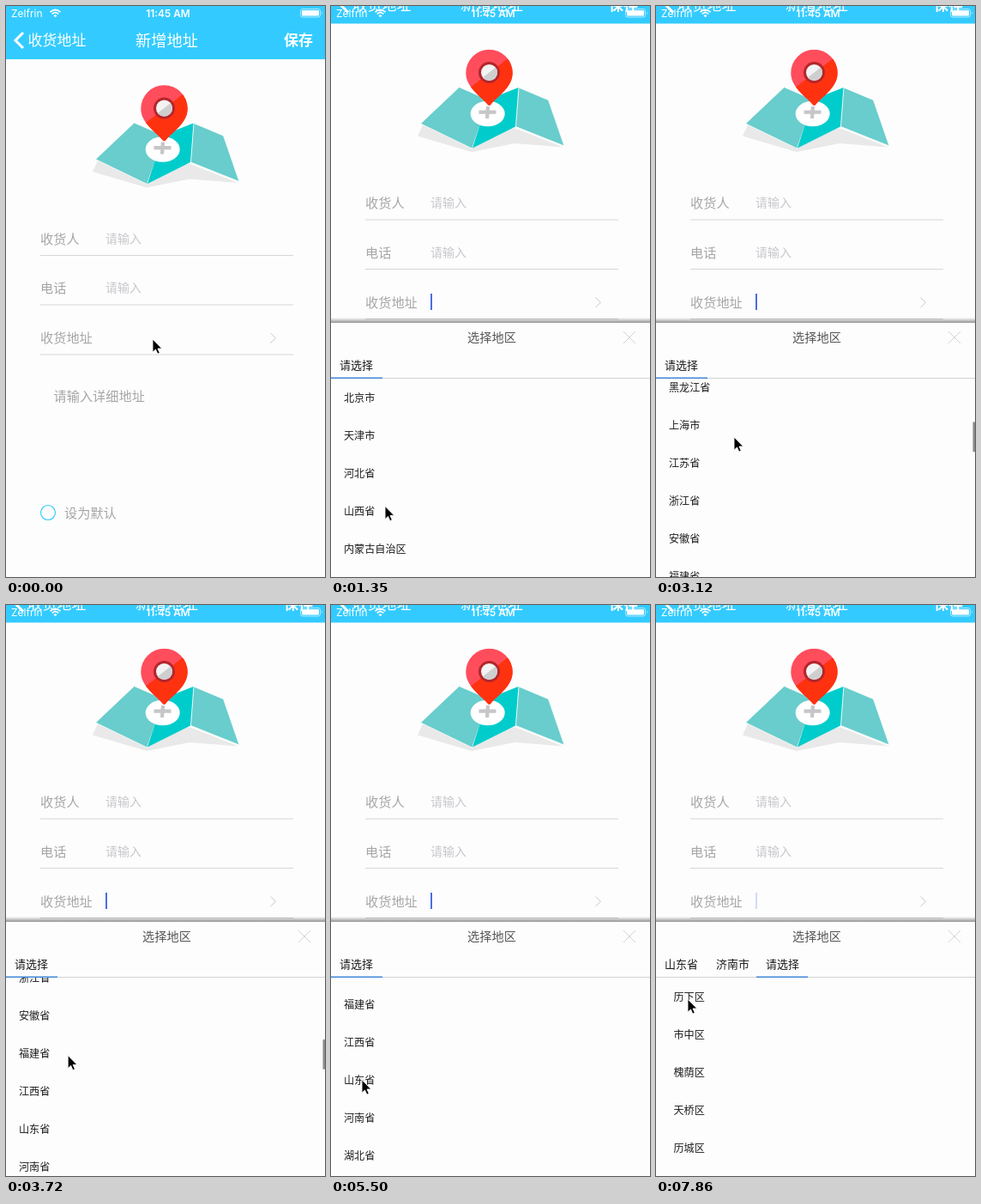
Write an HTML page that moves like this. It is 372x665 px and loops after 8 s.

```html
<!DOCTYPE html>
<html lang="zh-CN">
<head>
<meta charset="utf-8">
<title>新增地址</title>
<style>
html, body { margin: 0; width: 100%; height: 100%; overflow: hidden; background: #fdfdfd; }
svg { display: block; width: 372px; height: 665px; }
text { font-family: "Noto Sans CJK SC", "Noto Sans CJK", sans-serif; white-space: pre; }
.status text { font-family: Inter, Roboto, sans-serif; }
</style>
</head>
<body>
<svg viewBox="0 0 372 665" xmlns="http://www.w3.org/2000/svg">
  <defs>
    <linearGradient id="shade" x1="0" y1="0" x2="0" y2="1">
      <stop offset="0" stop-opacity="0"/>
      <stop offset="1" stop-opacity=".42"/>
    </linearGradient>
    <clipPath id="listClip"><rect y="434" width="372" height="240"/></clipPath>
    <clipPath id="pinClip"><path id="pinShape" d="M157.300 119.500a27.200 27.200 0 0 1 54.400 0C211.700 136 195 146 186.500 156Q184.500 158.500 182.500 156C174 146 157.300 136 157.300 119.500z"/></clipPath>
    <clipPath id="hubClip"><circle cx="184.500" cy="119" r="9.500"/></clipPath>
  </defs>
  <rect width="372" height="665" fill="#fdfdfd"/>

  <g id="page">
    <rect width="372" height="62" fill="#33cbff"/>
    <path d="M20 31L11 40L20 49" fill="none" stroke="#fff" stroke-width="3"/>

    <path d="M107 180L101 193L164 211.500L214 201.500L271 206L215 184z" fill="#e9e9e9"/>
    <path d="M149.500 136L104.500 178.500L164.500 207.500L184 151zM219 136.500L253.500 151L272 204.500L215.500 182z" fill="#68cdcc" stroke="#fdfdfd" stroke-width=".8"/>
    <path d="M183 150.500L218.500 136.500L215 182L165 207z" fill="#00cccc"/>
    <ellipse cx="182.700" cy="167" rx="20" ry="14.800" fill="#fff"/>
    <path d="M172.500 165.200H192.500M183 158.500L182 172.500" stroke="#c6c6c8" stroke-width="4.200"/>
    <g clip-path="url(#pinClip)">
      <rect x="150" y="90" width="70" height="70" fill="#ff4d5c"/>
      <path d="M150 146L220 92V165H150z" fill="#ff3210"/>
    </g>
    <circle cx="184.500" cy="119" r="12.500" fill="#b3262c"/>
    <g clip-path="url(#hubClip)">
      <rect x="174" y="108" width="22" height="22" fill="#f3f3f3"/>
      <path d="M170 130L200 107V135z" fill="#cfcfcf"/>
    </g>

    <path d="M40 290.500H335M40 348H335M40 406H335" stroke="#d6d6d6"/>
    <path d="M308.500 381L314.500 386.700L308.500 392.500" fill="none" stroke="#c8c8c8"/>
    <circle cx="49" cy="590" r="8.500" fill="none" stroke="#33cbff" stroke-width="1.200"/>
    <rect id="caret" x="116" y="376.500" width="2" height="19" fill="#4a6ee0"/>
  </g>

  <g class="status" fill="#fff">
    <text x="6" y="12.500" font-size="12">Zelfrin</text>
    <text x="189" y="12.500" font-size="11.800" font-weight="600" text-anchor="middle">11:45 AM</text>
    <path d="M51.500 7.200Q57.500 1.800 63.500 7.200M53.700 9.400Q57.500 6 61.300 9.400" fill="none" stroke="#fff" stroke-width="1.700"/>
    <path d="M55.500 11.200Q57.500 9.400 59.500 11.200L57.500 13.300z"/>
    <rect x="343.500" y="3.500" width="23" height="9.500" rx="2.500" fill="none" stroke="#fff" stroke-opacity=".6"/>
    <rect x="345" y="5" width="20" height="6.500" rx="1.200"/>
    <path d="M368 6.500q1.800 1.700 0 3.500z" fill-opacity=".7"/>
  </g>

  <g id="sheet">
    <rect y="363" width="372" height="6" fill="url(#shade)"/>
    <rect y="369" width="372" height="300" fill="#fdfdfd"/>
    <path d="M341 379L355 393M355 379L341 393" stroke="#d4d4d4"/>
    <path d="M0 433.500H372" stroke="#d2d2d2"/>
    <rect id="underline" y="432.500" width="60" height="1.500" fill="#3f86d8"/>
    <g clip-path="url(#listClip)"><g id="lists"></g></g>
    <rect id="bar" x="369.500" width="2.500" height="35" rx="1.200" fill="#8c8c8c"/>
  </g>

  <path id="cursor" d="M0 0V15.200L3.500 12L5.800 17.200L8.300 16.100L6 11H10.800z" fill="#000" stroke="#fff" stroke-width=".9"/>
</svg>
<script>
const NS = 'http://www.w3.org/2000/svg', LOOP = 8000, WIDTH = 372;
const $ = id => document.getElementById(id);

function add(parent, tag, attrs = {}) {
  const el = document.createElementNS(NS, tag);
  for (const k in attrs) el.setAttribute(k, attrs[k]);
  return parent.appendChild(el);
}

// y is the vertical centre of the glyphs
function label(parent, str, x, y, size, fill, extra) {
  const el = add(parent, 'text', { x, y: y + size * 0.38, 'font-size': size, fill, ...extra });
  el.textContent = str;
  return el;
}

const middle = { 'text-anchor': 'middle' };
const page = $('page'), sheet = $('sheet');
label(page, '收货地址', 25.5, 40, 17, '#fff');
label(page, '新增地址', 187.5, 40, 18.2, '#fff', middle);
label(page, '保存', 324, 40, 17, '#fff', { 'font-weight': 700 });
label(page, '收货人', 40, 271, 15.2, '#a6a6a6');
label(page, '电话', 40, 328.5, 15.2, '#a6a6a6');
label(page, '收货地址', 40, 386.5, 15.2, '#a6a6a6');
label(page, '请输入', 116, 270.5, 14, '#c7c7cc');
label(page, '请输入', 116, 328, 14, '#c7c7cc');
label(page, '请输入详细地址', 55.5, 454, 15.2, '#a6a6a6');
label(page, '设为默认', 68, 590, 15.2, '#a6a6a6');
label(sheet, '选择地区', 187.5, 386, 14.2, '#555', middle);
const tabs = [10, 70, 128].map(x => label(sheet, '', x, 418, 13, '#1c1c1c'));

const regions = [
  '北京市 天津市 河北省 山西省 内蒙古自治区 辽宁省 吉林省 黑龙江省 上海市 江苏省 ' +
  '浙江省 安徽省 福建省 江西省 山东省 河南省 湖北省 湖南省 广东省',
  '济南市 青岛市 淄博市 枣庄市 东营市',
  '历下区 市中区 槐荫区 天桥区 历城区'
];
const columns = regions.map((names, c) => {
  const g = add($('lists'), 'g');
  names.split(' ').forEach((n, i) => label(g, n, 15 + c * WIDTH, 456 + i * 44, 12.1, '#1c1c1c'));
  return g;
});

const clamp = v => Math.min(1, Math.max(0, v));
const ease = (t, start, dur) => {
  const p = clamp((t - start) / dur);
  return p * p * (3 - 2 * p);
};
const move = (el, x, y) => el.setAttribute('transform', `translate(${x} ${y})`);

// time, x, y of the pointer tip
const path = [
  [700, 171, 388], [1330, 63, 582], [1500, 66, 625], [2000, 78, 612], [2520, 84, 624],
  [2672, 86, 590], [2820, 91, 502], [3400, 91, 502], [4200, 34, 570], [4500, 34, 570],
  [4890, 34, 556], [5400, 36, 553], [6600, 36, 553], [7450, 37, 459]
];

function pointer(t) {
  let [, x, y] = path[0];
  for (let i = 1; i < path.length; i++) {
    const [t0, x0, y0] = path[i - 1], [t1, x1, y1] = path[i];
    if (t < t0) break;
    const p = ease(t, t0, t1 - t0);
    x = x0 + (x1 - x0) * p;
    y = y0 + (y1 - y0) * p;
  }
  return [x, y];
}

// exponential slowdown after the flick, stopping at low speed
const scrollAt = t => Math.min(519, Math.max(0, 526.2 - 206.2 * Math.exp((3116 - t) / 510)));

function caretAt(t) {
  if (t < 748) return 0;
  if (t > 2600 && t < 5000) return 1; // blinking pauses while scrolling
  const u = t % 1000 / 1000;
  return u < 0.5 ? clamp((u - 0.08) / 0.14) : clamp((0.9 - u) / 0.2);
}

const sample = t => t < 600 ? 0 : 600 + 148 * Math.floor((t - 600) / 148);

function render(time) {
  const t = sample(time);
  const open = ease(t, 550, 320);
  const city = ease(t, 6210, 250), district = ease(t, 7620, 250);
  const scroll = scrollAt(t);

  move(page, 0, -41.5 * open);
  move(sheet, 0, 310 * (1 - open));
  $('caret').setAttribute('opacity', caretAt(t));

  const chosen = [];
  if (city > 0) chosen.push('山东省');
  if (district > 0) chosen.push('济南市');
  chosen.push('请选择');
  tabs.forEach((el, i) => { el.textContent = chosen[i] || ''; });
  $('underline').setAttribute('x', 59.5 * city + 58.5 * district);

  move($('lists'), -WIDTH * (city + district), 0);
  move(columns[0], 0, -scroll);
  $('bar').setAttribute('y', 435.7 + scroll * 0.152);
  $('bar').setAttribute('opacity', scroll > 0 ? clamp((5150 - t) / 220) : 0);
  move($('cursor'), ...pointer(t));
}

const start = performance.now();
function tick() {
  render((performance.now() - start) % LOOP);
  requestAnimationFrame(tick);
}
tick();
</script>
</body>
</html>
```
